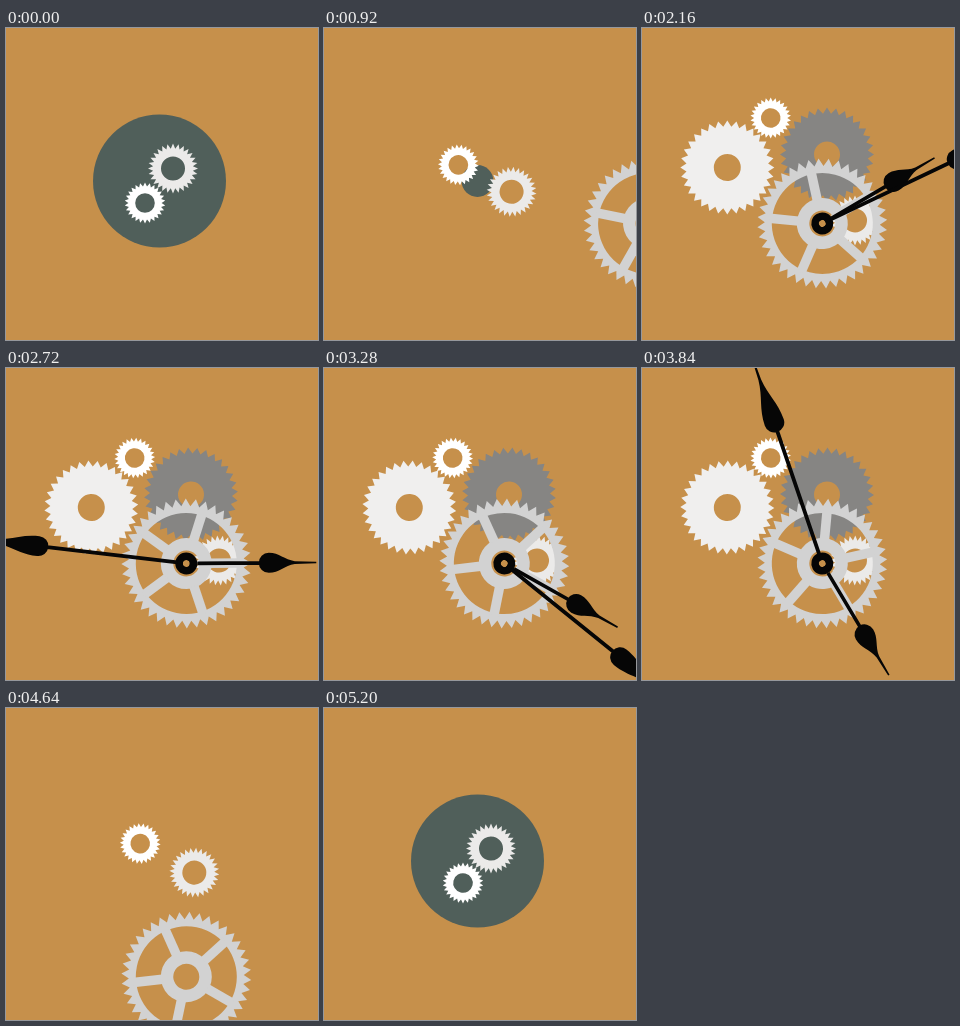
Write an HTML page with a canvas that moves like this. It is 312 px wide and 312 px high and loops after 6 s.

```html
<!DOCTYPE html>
<html>
<head>
<meta charset="utf-8">
<style>
  html, body { margin: 0; height: 100%; overflow: hidden; background: #c6904b; }
  canvas { display: block; }
</style>
</head>
<body>
<canvas id="stage" width="312" height="312"></canvas>
<script>
const ctx = document.getElementById('stage').getContext('2d');
const TAU = Math.PI * 2, LOOP = 6000, STEP = 40;
const START = 640, END = 5200, TEETH_PASSED = 27, HANDS_ZERO = 1040;
const HOUR_RATE = TAU / 40 * TEETH_PASSED / (END - START);
const MINUTE_RATE = 379 / 360 * TAU / 1000;

const progress = (t, from, to) => Math.min(1, Math.max(0, (t - from) / (to - from)));
const mix = (a, b, p) => a + (b - a) * p;
const easeIn = p => p * p;
const easeOut = p => 1 - (1 - p) ** 2;
const easeSine = p => (1 - Math.cos(Math.PI * p)) / 2;
const easeBack = p => 1 + 1.9 * (p - 1) ** 3 + 0.9 * (p - 1) ** 2;

function at(x, y, angle, scale, draw) {
  if (scale <= 0) return;
  ctx.save();
  ctx.translate(x, y);
  ctx.rotate(angle);
  ctx.scale(scale, scale);
  draw();
  ctx.restore();
}

function disc(r) {
  ctx.moveTo(r, 0);
  ctx.arc(0, 0, r, 0, TAU);
}

function cog(teeth, outer, root, hole, color) {
  ctx.fillStyle = color;
  ctx.beginPath();
  for (let i = 0; i < teeth * 2; i++) {
    const r = i % 2 ? root : outer, a = i * Math.PI / teeth;
    ctx.lineTo(r * Math.sin(a), -r * Math.cos(a));
  }
  ctx.closePath();
  disc(hole);
  ctx.fill('evenodd');
}

function wheel() {
  const color = '#d2d2d2';
  cog(40, 65, 57.5, 50.5, color);
  ctx.beginPath();
  disc(25.5);
  disc(13);
  ctx.fill('evenodd');
  ctx.strokeStyle = color;
  ctx.lineWidth = 9.5;
  for (let i = 0; i < 5; i++) {
    ctx.beginPath();
    ctx.moveTo(0, -24);
    ctx.lineTo(0, -53);
    ctx.stroke();
    ctx.rotate(TAU / 5);
  }
}

// Drawn pointing up: hub, rod, teardrop and thin tip, as one shape so that it fades evenly
function hand(hub, rod, drop, taper, tip) {
  const neck = drop + taper;
  ctx.fillStyle = '#060606';
  ctx.beginPath();
  disc(hub);
  disc(3.5);
  ctx.fill('evenodd');
  ctx.beginPath();
  ctx.rect(-rod / 2, -drop + 9, rod, drop - 9 - hub);
  ctx.moveTo(10, -drop);
  ctx.arc(0, -drop, 10, 0, Math.PI);
  ctx.bezierCurveTo(-10, -drop - taper * 0.4, -3, -drop - taper * 0.6, -1.4, -neck);
  ctx.lineTo(-0.8, -tip);
  ctx.lineTo(0.8, -tip);
  ctx.lineTo(1.4, -neck);
  ctx.bezierCurveTo(3, -drop - taper * 0.6, 10, -drop - taper * 0.4, 10, -drop);
  ctx.fill();
}

function render(t) {
  ctx.fillStyle = '#c6904b';
  ctx.fillRect(0, 0, 312, 312);

  const turned = progress(t, START, END) * TEETH_PASSED * TAU;
  const hour = (t - HANDS_ZERO) * HOUR_RATE;
  const minute = (t - HANDS_ZERO) * MINUTE_RATE;
  const spread = t < 3000 ? easeSine(progress(t, START, 1240))
                          : 1 - easeSine(progress(t, 4300, 4950));
  const badge = t < 3000 ? easeBack(1 - progress(t, START, 940))
                         : easeBack(progress(t, 4900, END));
  const grow = (inFrom, inTo, outFrom, outTo) =>
    easeOut(progress(t, inFrom, inTo)) - easeIn(progress(t, outFrom, outTo));

  at(153.5, 153, 0, badge, () => {
    ctx.fillStyle = '#505f5a';
    ctx.beginPath();
    disc(66.5);
    ctx.fill();
  });
  at(185, 126.5, -turned / 32, grow(1240, 1535, 4080, 4380),
    () => cog(32, 47, 41, 13, '#868583'));
  at(85.3, 139.5, -turned / 32, grow(1000, 1290, 4200, 4500),
    () => cog(32, 47, 41, 13.5, '#f0efee'));
  at(mix(167, 213, spread), mix(140.5, 192.5, spread), -turned / 28, 1,
    () => cog(28, 25, 20, 12, '#ebeae9'));
  at(mix(139, 128.7, spread), mix(175, 90, spread), turned / 26, 1,
    () => cog(26, 20.4, 16.6, 9.8, '#fff'));

  const slide = easeOut(progress(t, 860, 1260));
  const drop = easeIn(progress(t, 4400, 4800));
  at(mix(380, 180.3, slide), mix(195.5, 399, drop), hour, 1, wheel);

  const fadeOut = progress(t, 4020, 4120);
  ctx.globalAlpha = progress(t, 1420, 1520) - fadeOut;
  at(180.3, 195.5, hour, 1, () => hand(11, 3.6, 82.5, 26, 130));
  ctx.globalAlpha = progress(t, 1405, 1505) - fadeOut;
  at(180.3, 195.5, minute, 1, () => hand(9, 3.8, 149, 45, 215));
  ctx.globalAlpha = 1;
}

function tick() {
  const t = performance.now() % LOOP;
  render(Math.floor(t / STEP) * STEP);
  requestAnimationFrame(tick);
}
tick();
</script>
</body>
</html>
```
